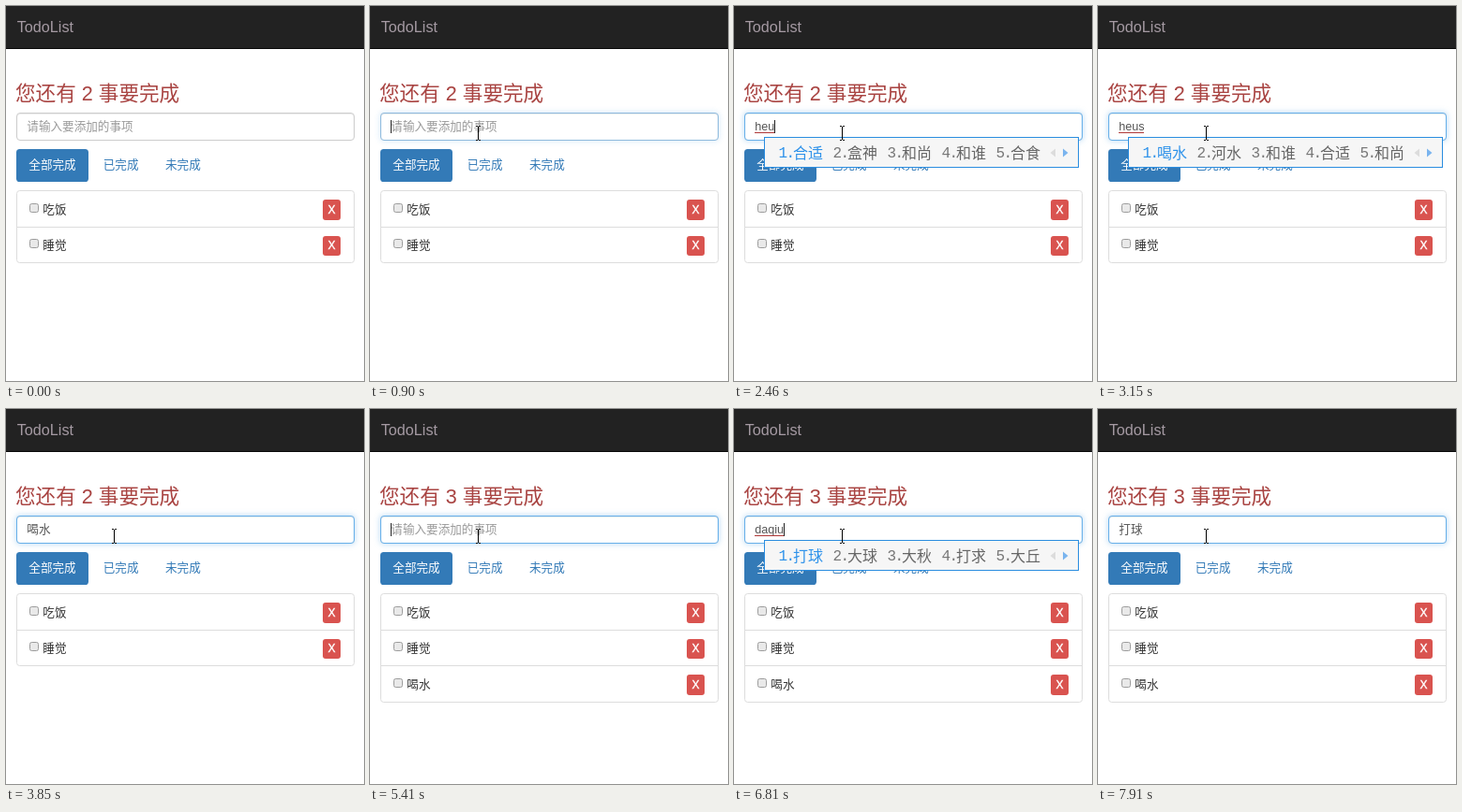
Write an HTML page that moves like this. It is 382 px wide and 401 px high and loops after 8 s.

```html
<!DOCTYPE html>
<html lang="zh-CN">
<head>
<meta charset="utf-8">
<title>TodoList</title>
<style>
html, body { margin: 0; width: 100%; height: 100%; overflow: hidden; background: #fff; }
#stage { position: relative; width: 382px; height: 401px; overflow: hidden; }
.field { position: absolute; left: 11px; top: 114px; width: 361px; height: 30px; box-sizing: border-box;
  border: 1px solid #ccc; border-radius: 4px; background: #fff; box-shadow: inset 0 1px 1px rgba(0,0,0,.075); }
#glow { border-color: #66afe9; opacity: 0;
  box-shadow: inset 0 1px 1px rgba(0,0,0,.075), 0 0 6px rgba(102,175,233,.5); }
svg { position: absolute; left: 0; top: 0; }
text { font: 12.6px "Liberation Sans", "Noto Sans CJK SC", "Noto Sans CJK", sans-serif; fill: #333; white-space: pre; }
.brand { font-size: 16.2px; fill: #a59aa3; }
.title { font-size: 21.6px; fill: #a94442; }
.hint { fill: #999; }
.link { fill: #337ab7; }
.white { fill: #fff; font-weight: 500; }
.x { font-size: 12px; fill: #fff; stroke: #fff; stroke-width: .4; text-anchor: middle; }
#typed { fill: #555; }
.word { font-size: 16px; font-weight: 300; fill: #666; }
.num { font: 16px "Liberation Mono", monospace; letter-spacing: -1.6px; fill: #777; }
.first { fill: #2e92ea; }
</style>
</head>
<body>
<div id="stage">
  <div class="field"></div>
  <div class="field" id="glow"></div>
  <svg width="382" height="401" viewBox="0 0 382 401">
    <rect width="382" height="46" fill="#222"/>
    <rect y="45" width="382" height="1" fill="#080808"/>
    <text class="brand" x="11.7" y="28">TodoList</text>
    <text class="title" id="title" x="10" y="101"></text>
    <text class="hint" id="hint" x="22.3" y="133">请输入要添加的事项</text>
    <text id="typed" x="22.3" y="133"></text>
    <path id="under" stroke="#b03a3a" fill="none"/>
    <rect id="caret" width="1" height="14" fill="#222"/>
    <rect x="11" y="153" width="77" height="35" rx="3.6" fill="#337ab7"/>
    <text class="white" x="24.3" y="173.5">全部完成</text>
    <text class="link" x="103.7" y="173.5">已完成</text>
    <text class="link" x="170" y="173.5">未完成</text>
    <rect id="frame" x="11.5" y="197.5" width="360" height="77" rx="3.1" fill="none" stroke="#ddd"/>
    <g id="rows"></g>
    <g id="popup"></g>
    <path id="arrow" d="M.5 .5V16l3.6-3.4 2.4 5.6 2.2-1-2.4-5.4h5z" fill="#fff" stroke="#000"/>
    <path id="beam" d="M-3 -7.5h2m1 0h2M-.5 -7V7M-3 7.5h2m1 0h2" fill="none" stroke="#000"/>
  </svg>
</div>
<script>
const LOOP = 8000, ADDED = 4330;
const $ = id => document.getElementById(id);

// time, input text, candidates ("+" marks a badge), caret shown
const states = [
  [0, '', '', 0],
  [830, '', '', 1],
  [1380, '', '', 0],
  [1530, 'h', '好+ 会 和 还 很', 1],
  [1680, 'he', '和+ 喝 河 何 合', 1],
  [2230, 'he', '和+ 喝 河 何 合', 0],
  [2460, 'heu', '合适 盒神 和尚 和谁 合食', 1],
  [2690, 'heus', '喝水 河水 和谁 合适 和尚', 1],
  [3150, 'heus', '喝水 河水 和谁 合适 和尚', 0],
  [3320, '喝水', '', 1],
  [3850, '喝水', '', 0],
  [ADDED, '', '', 1],
  [4860, '', '', 0],
  [5410, '', '', 1],
  [5880, 'd', '', 1],
  [5950, 'd', '的+ 都 到 对 大', 1],
  [6030, 'da', '大+ 打 哒 搭 达', 1],
  [6510, 'daq', '大气 打球 大全 大+ 打钱', 1],
  [6810, 'daqiu', '打球 大球 大秋 打求 大丘', 1],
  [7360, '打球', '', 1],
  [7910, '打球', '', 0]
];

// Row height is fractional: edges round, contents floor.
const row = (name, i) => {
  const exact = 197 + 38.7 * i;
  const edge = Math.round(exact), y = Math.floor(exact);
  const line = i ? `<path d="M12 ${edge + .5}h359" stroke="#ddd"/>` : '';
  return `<g>${line}
    <rect x="25.5" y="${y + 14.5}" width="9" height="9" rx="2" fill="#e9e9e9" stroke="#9c9c9c"/>
    <text x="39.3" y="${y + 24.6}">${name}</text>
    <rect x="338" y="${edge + 10}" width="19" height="${y + 22 - edge}" rx="3" fill="#d9534f"/>
    <text class="x" x="347.6" y="${y + 25.3}">X</text></g>`;
};
$('rows').innerHTML = ['吃饭', '睡觉', '喝水'].map(row).join('');

function popup(list) {
  if (!list) return '';
  let x = 47, out = '';
  list.split(' ').forEach((item, i) => {
    const word = item.replace('+', ''), first = i ? '' : ' first';
    out += `<text class="num${first}" x="${x + .5}" y="162">${i + 1}.</text>
      <text class="word${first}" x="${x + 16}" y="162.5">${word}</text>`;
    x += 16 + 16 * word.length;
    if (item !== word) {
      out += `<rect x="${x + 2}" y="149" width="7" height="7" rx="1" fill="#6a9fd0"/>
        <path d="M${x + 3.5} 152.5h4m-2 -2v4" stroke="#fff"/>`;
      x += 8;
    }
    x += 10;
  });
  const right = x + 31;
  return `<rect x="32.5" y="140.5" width="${right - 33}" height="32" fill="#f6f6f6" stroke="#2a8de0"/>${out}
    <path d="M${right - 25} 152.5v9l-5.5 -4.5z" fill="#dcdcdc"/>
    <path d="M${right - 17} 152.5v9l5.5 -4.5z" fill="#7ab4ee"/>`;
}

const show = (el, on) => el.setAttribute('visibility', on ? 'visible' : 'hidden');

function setState([time, text, list, caret]) {
  const composing = /[a-z]/.test(text), added = time >= ADDED;
  $('typed').textContent = text;
  const width = text ? $('typed').getComputedTextLength() : 0;
  $('under').setAttribute('d', composing ? `M22 135.5h${Math.round(width)}` : '');
  $('caret').setAttribute('x', Math.floor(22.3 + width));
  $('caret').setAttribute('y', text && !composing ? 123 : 122);
  show($('caret'), caret);
  show($('hint'), !text);
  $('popup').innerHTML = popup(list);
  $('title').textContent = `您还有 ${added ? 3 : 2} 事要完成`;
  $('frame').setAttribute('height', added ? 116 : 77);
  show($('rows').lastElementChild, added);
}

function setPointer(t) {
  const step = Math.min(5, Math.floor((t - 210) / 78));
  const p = 1 - (1 - step / 5) ** 2;
  const x = Math.round(188 - 72 * p), y = Math.round(9 + 127 * p);
  const inField = y > 114;
  show($('arrow'), step >= 0 && !inField);
  show($('beam'), step >= 0 && inField);
  for (const id of ['arrow', 'beam']) $(id).setAttribute('transform', `translate(${x} ${y})`);
}

const start = performance.now();
let current;
function draw() {
  const t = (performance.now() - start) % LOOP;
  const state = states.findLast(s => s[0] <= t);
  if (state !== current) setState(current = state);
  setPointer(t);
  $('glow').style.opacity = t < 830 ? 0 : t < 900 ? .15 : t < 980 ? .6 : 1;
  requestAnimationFrame(draw);
}
draw();
</script>
</body>
</html>
```
